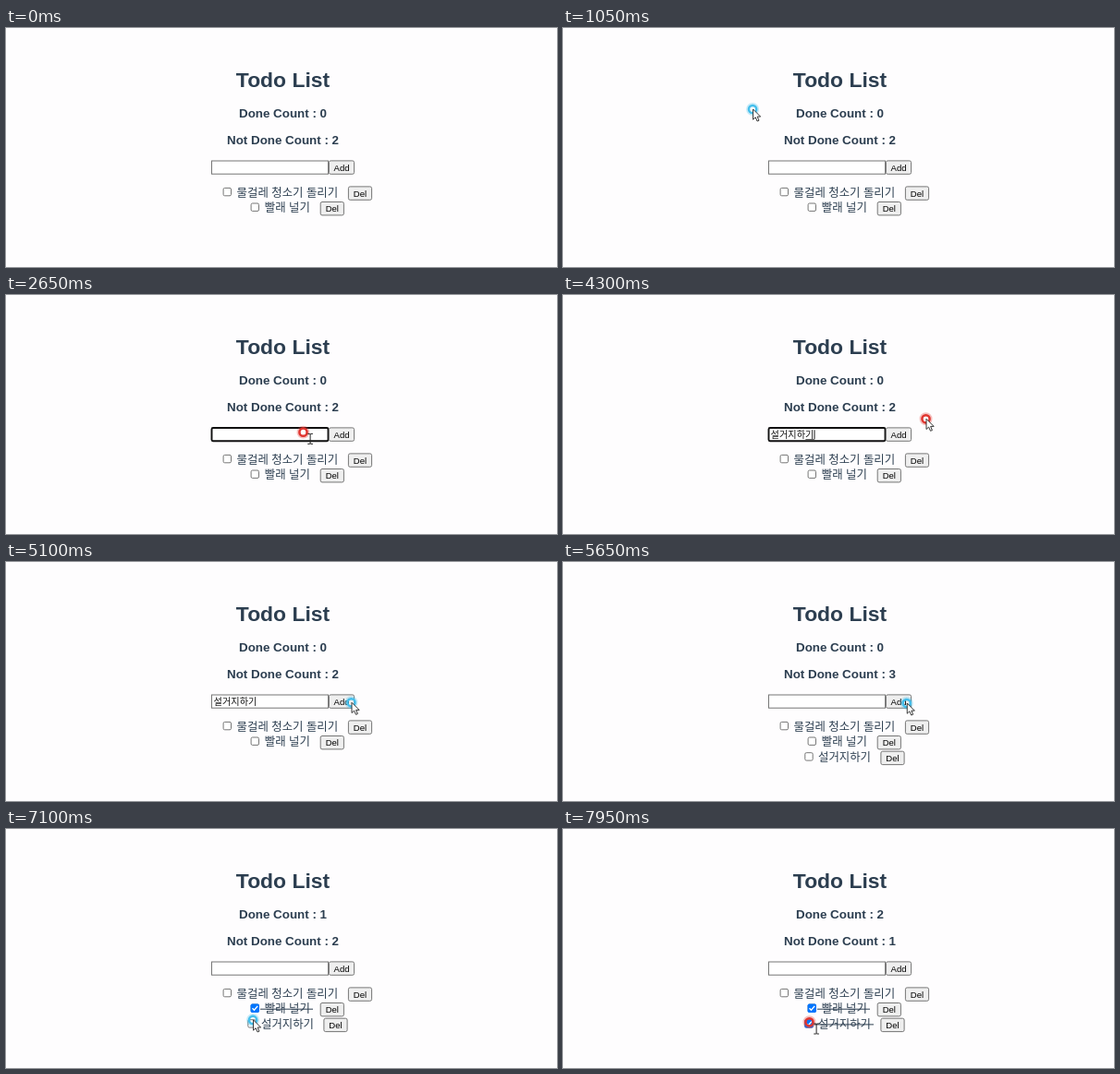
These frames come from a looping animation (596 by 259 pixels, 8000 ms). An HTML page:

```html
<!DOCTYPE html>
<html lang="ko">
<head>
<meta charset="utf-8">
<style>
html, body { margin: 0; width: 100%; height: 100%; overflow: hidden; background: #fefdfe; }
svg { display: block; }
text { font-family: "Liberation Sans", "Noto Sans CJK KR", sans-serif; fill: #2c3e50; }
.head { font-weight: bold; text-anchor: middle; font-size: 13.37px; }
.btn { font-size: 9.52px; text-anchor: middle; fill: #000; }
.item { font-size: 12.4px; }
.box { fill: #fff; stroke: #767676; }
</style>
</head>
<body>
<svg id="stage" width="596" height="259" viewBox="0 0 596 259">
  <text class="head" x="299.5" y="64.2" style="font-size:22.9px">Todo List</text>
  <text class="head" x="299.5" y="96.8" id="done"></text>
  <text class="head" x="299.5" y="126.3" id="left"></text>
  <rect class="box" id="field" x="222.5" y="144" width="126" height="14.2"/>
  <text id="typed" x="224.6" y="155.2" style="font-size:10.2px;fill:#111"></text>
  <path id="under" stroke="#222" stroke-width=".8"/>
  <path id="caret" stroke="#000" stroke-width=".9"/>
  <g id="list"></g>
  <g id="pointer">
    <circle id="halo" r="5" fill="none" stroke-width="4" opacity=".3"/>
    <circle id="ring" r="4.1" fill="none" stroke-width="2.5"/>
    <path id="arrow" d="M.5 0V11.2L3.1 8.8 5 13 6.9 12.2 5.1 8.1H8.6Z" fill="#fff" stroke="#222" stroke-width=".9"/>
    <path id="beam" d="M4.8 1.7H6.9L7.6 2.3 8.3 1.7H10.4M7.6 2V12.4M4.8 12.7H6.9L7.6 12.1 8.3 12.7H10.4" fill="none" stroke="#222"/>
  </g>
</svg>
<script>
const $ = id => document.getElementById(id);
const LOOP = 8000, FOCUS = 2100, TYPE = 2900, STEP = 115, BLUR = 5050, ADD = 5350;
const steps = "ㅅ 서 설 섥 설거 설겆 설거지 설거짛 설거지하 설거지학 설거지하기".split(" ");
const TYPED = TYPE + STEP * (steps.length - 1);
const CHAR = 9.38;

// Text, checkbox centre, text start and end, button left, row centre, time added, time checked
const items = [
  ["물걸레 청소기 돌리기", 239.3, 249.6, 359, 370, 178.3, 0, Infinity],
  ["빨래 널기", 269.3, 279.8, 329, 339.8, 194.9, 0, 6500],
  ["설거지하기", 266, 276, 333, 343.5, 211.6, ADD, 7300]
];

// Pointer: time, x, y
const path = [
  [750, 54, -8], [1300, 320, 161], [1650, 290, 146.5], [2050, 321.5, 148.7],
  [4150, 321.5, 148.7], [4300, 392.5, 134.3], [4600, 563, 210], [4900, 376, 153],
  [5100, 373.5, 152.3], [5600, 373.5, 152.3], [6250, 270, 194.3],
  [6800, 270, 194.3], [7200, 266.5, 209.3], [8000, 266.5, 209.3]
];
const presses = [[2050, 2850], [4250, 4400], [5250, 5550], [6450, 6750], [7250, 8000]];

const button = (x, y, w, label) =>
  `<rect class="box" style="fill:#efefef" x="${x + .4}" y="${y - 7.2}" width="${w - .8}" height="14.4" rx="1.8"/>
   <text class="btn" x="${x + w / 2}" y="${y + 3.5}">${label}</text>`;

$("list").innerHTML = button(349, 151.1, 28, "Add") + items.map(([label, cx, x0, x1, bx, y]) =>
  `<g class="row">
    <rect class="box" x="${cx - 4.2}" y="${y - 4.9}" width="8.4" height="8.4" rx="1.5"/>
    <text class="item" x="${x0}" y="${y + 4.4}">${label}</text>
    <g class="tick" fill="none">
      <rect x="${cx - 4.7}" y="${y - 5.4}" width="9.4" height="9.4" rx="1.7" fill="#0075ff"/>
      <path d="M${cx - 2.8} ${y - .6}l2 2 3.7-4.4" stroke="#fff" stroke-width="1.4"/>
      <path d="M${x0 - 4.8} ${y + .3}H${x1 + 3}" stroke="#2c3e50"/>
    </g>
    ${button(bx, y + .8, 26, "Del")}
  </g>`).join("");
const rows = [...document.querySelectorAll(".row")];

const show = (el, on) => el.setAttribute("visibility", on ? "inherit" : "hidden");

function pointerAt(t) {
  const i = path.findIndex(p => p[0] > t);
  if (i < 1) return path[0].slice(1);
  const [t0, x0, y0] = path[i - 1], [t1, x1, y1] = path[i];
  const u = (t - t0) / (t1 - t0), e = u * u * (3 - 2 * u);
  return [x0 + (x1 - x0) * e, y0 + (y1 - y0) * e];
}

function drawField(t) {
  const focused = t >= FOCUS && t < BLUR;
  $("field").style.cssText = focused ? "stroke:#101010;stroke-width:1.9;rx:1.5px" : "";
  const word = t < TYPE || t >= ADD ? "" : steps[Math.min(steps.length - 1, Math.floor((t - TYPE) / STEP))];
  $("typed").textContent = word;
  const end = 224.8 + word.length * CHAR;
  $("under").setAttribute("d", `M${end - CHAR} 156.6H${end}`);
  show($("under"), focused && word);
  $("caret").setAttribute("d", `M${end + .3} 146.3V156.4`);
  const since = t < TYPE ? t - FOCUS : Math.max(0, t - TYPED);
  show($("caret"), focused && Math.floor(since / 530) % 2 === 0);
}

function drawList(t) {
  let done = 0, left = 0;
  items.forEach((item, i) => {
    const added = t >= item[6], checked = t >= item[7];
    show(rows[i], added);
    show(rows[i].querySelector(".tick"), checked);
    if (checked) done++;
    else if (added) left++;
  });
  $("done").textContent = "Done Count : " + done;
  $("left").textContent = "Not Done Count : " + left;
}

function drawPointer(t) {
  const [x, y] = pointerAt(t);
  const pressed = presses.some(([a, b]) => t >= a && t < b);
  const overText = x > 222 && x < 349 && y > 143 && y < 159 || t >= 7500;
  $("pointer").setAttribute("transform", `translate(${x} ${y})`);
  show($("pointer"), t >= 750);
  for (const id of ["ring", "halo"]) $(id).setAttribute("stroke", pressed ? "#e0352f" : "#45bfec");
  show($("beam"), overText);
  show($("arrow"), !overText);
}

function frame(now) {
  const t = Math.floor(now % LOOP / 50) * 50;
  drawField(t);
  drawList(t);
  drawPointer(t);
  requestAnimationFrame(frame);
}
frame(0);
</script>
</body>
</html>
```
